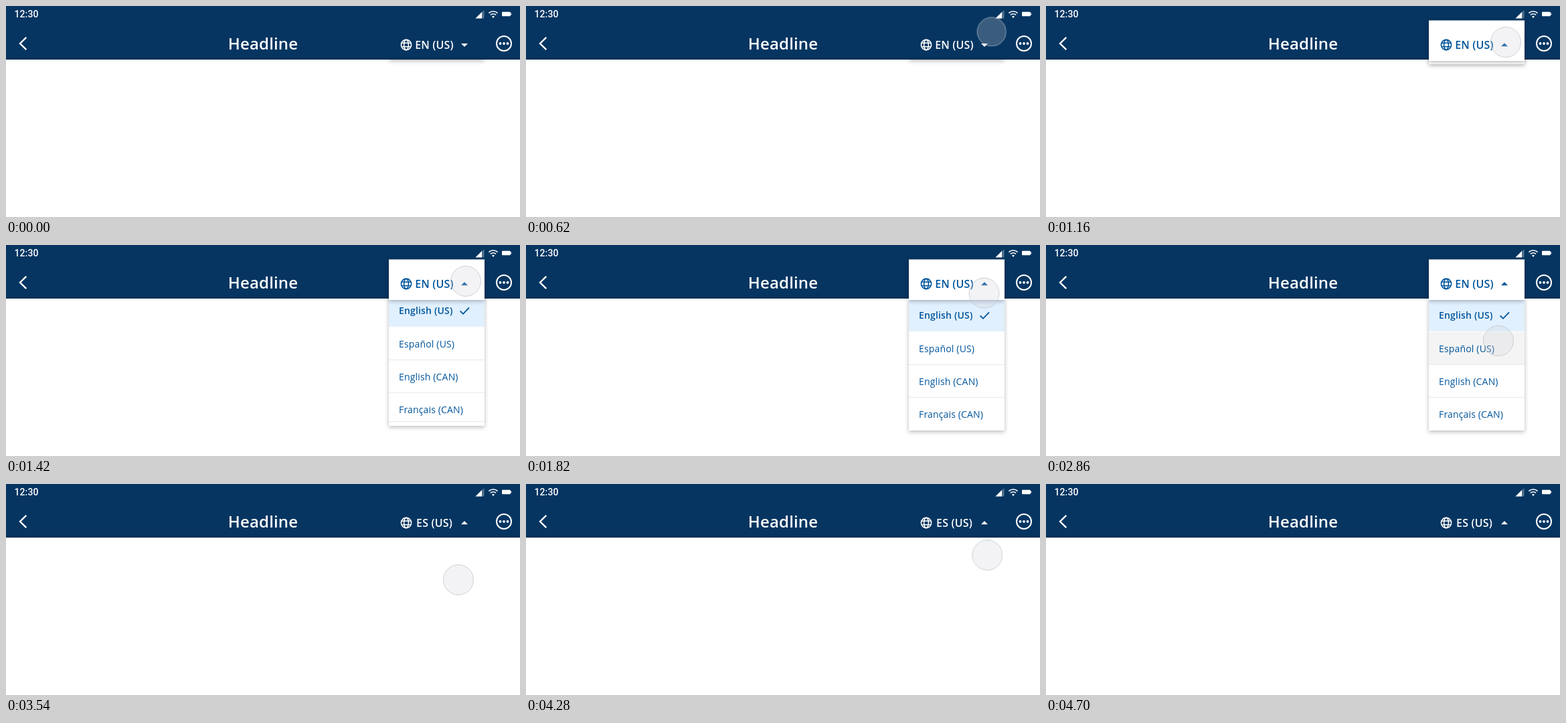
These frames come from a looping animation (768 by 315 pixels, 5400 ms). An HTML page:

```html
<!DOCTYPE html>
<html lang="en">
<head>
<meta charset="utf-8">
<title>Language menu</title>
<style>
  html, body { margin: 0; width: 100%; height: 100%; overflow: hidden; background: #fff; }
  svg { display: block; width: 768px; height: 315px; font-family: "Open Sans", sans-serif; letter-spacing: .01em; }

  .headline { font-size: 24px; font-weight: 600; }
  .clock { font: 500 14px Roboto, sans-serif; letter-spacing: .1px; }
  .label { font-size: 16px; font-weight: 600; text-anchor: middle; }
  .rows { font-size: 14px; fill: #00559b; }
  .bold { font-weight: 600; }
  .icon { fill: none; stroke: currentColor; }
  .shadow { filter: drop-shadow(0 2px 3px rgba(0, 0, 0, .28)); }

  /* One 5.4 s loop: 1% = 54 ms */
  .list, .pointer, .ring, .control, .switch { animation: 5.4s linear infinite both; }
  .switch { animation-timing-function: step-end; }
  .control { animation-name: tint; animation-timing-function: step-end; }
  .list { animation-name: drop; }
  .pointer { animation-name: travel; }
  .ring { animation-name: grow; transform-box: fill-box; transform-origin: center; }

  .panel { animation-name: open; }
  .closed { animation-name: closed; }
  .opened { animation-name: opened; }
  .first { animation-name: first; }
  .second { animation-name: second; }
  .hover { animation-name: hover; }
  .edge { animation-name: edge; }
  .shown { animation-name: shown; }

  @keyframes tint { 0%, 61.481% { color: #fff } 20.741% { color: #00559b } }
  @keyframes open { 0%, 61.481% { opacity: 0 } 20.741% { opacity: 1 } }
  @keyframes shown { 0% { opacity: 1 } 61.481%, 100% { opacity: 0 } }
  @keyframes closed { 0% { opacity: 1 } 20.741%, 100% { opacity: 0 } }
  @keyframes opened { 0% { opacity: 0 } 20.741%, 100% { opacity: 1 } }
  @keyframes first { 0% { opacity: 1 } 56.296%, 100% { opacity: 0 } }
  @keyframes second { 0% { opacity: 0 } 56.296%, 100% { opacity: 1 } }
  @keyframes hover { 0%, 56.296%, 100% { opacity: 0 } 38.889% { opacity: 1 } }
  @keyframes edge { 0% { opacity: 1 } 27.963%, 100% { opacity: 0 } }

  @keyframes drop {
    0%, 20.648% { transform: translateY(-197px); animation-timing-function: cubic-bezier(.4, 0, .2, 1) }
    28.056%, 100% { transform: none }
  }
  @keyframes travel {
    0%, 3.704% { transform: translate(733px, -28px); animation-timing-function: cubic-bezier(.333, 1, .667, 1) }
    22.037% { transform: translate(687px, 54px) }
    30% { transform: translate(687px, 54px); animation-timing-function: cubic-bezier(.4, 0, .7, .95) }
    41.111% { transform: translate(675px, 140px); animation-timing-function: ease-in-out }
    52.963% { transform: translate(676px, 143px) }
    73.8% { transform: translate(676px, 143px); animation-timing-function: ease-in-out }
    92.3%, 100% { transform: translate(749px, -59px) }
  }
  @keyframes grow {
    0%, 17% { transform: scale(.957) }
    20.5%, 100% { transform: none }
  }
</style>
</head>
<body>
<svg viewBox="0 0 768 315">
  <defs>
    <linearGradient id="shade" x2="0" y2="1">
      <stop offset="0" stop-opacity="0"/>
      <stop offset="1" stop-opacity=".14"/>
    </linearGradient>
    <clipPath id="below"><path d="M560 82h170v233h-170z"/></clipPath>
    <path id="check" d="M678.7 105.5l4.3 4.3 9-9.3" fill="none" stroke="#00559b" stroke-width="1.8"/>
  </defs>

  <!-- Menu, sliding out from behind the bar -->
  <g class="switch shown">
    <g class="list">
      <path class="shadow" d="M572 82h143v195h-143z" fill="#fff"/>
      <g class="rows">
        <g class="switch first">
          <path d="M572 82h143v47h-143z" fill="#e1f0fe"/>
          <text class="bold" x="587" y="110">English (US)</text>
          <use href="#check"/>
          <text x="587" y="160" opacity="0">Español (US)</text>
        </g>
        <path class="switch hover" d="M572 130h143v48h-143z" fill="#f4f4f4"/>
        <g class="switch first"><text x="587" y="160">Español (US)</text></g>
        <g class="switch second">
          <path d="M572 130h143v48h-143z" fill="#e1f0fe"/>
          <text x="587" y="110">English (US)</text>
          <text class="bold" x="587" y="160">Español (US)</text>
          <use href="#check" y="50"/>
        </g>
        <text x="587" y="209">English (CAN)</text>
        <text x="587" y="258">Français (CAN)</text>
        <path d="M572 178h143v1h-143zM572 227h143v1h-143z" fill="#e8e9eb"/>
        <path class="switch edge" d="M572 270h143v1h-143z" fill="#e8e9eb"/>
      </g>
    </g>
  </g>

  <!-- App bar -->
  <path d="M0 0h768v80H0z" fill="#063561"/>
  <path d="M0 75h768v5H0z" fill="url(#shade)"/>
  <g fill="#fff" color="#fff">
    <text class="clock" x="12.5" y="17">12:30</text>
    <path d="M701.5 18.5L714.5 6v12.5z" opacity=".3"/>
    <path d="M701.5 18.5L711 9v9.5z"/>
    <g class="icon" stroke-width="1.7">
      <path d="M721.4 10.7a9.4 9.4 0 0 1 13.2 0M724 13.4a5.7 5.7 0 0 1 8 0"/>
    </g>
    <path d="M728 18l-2-2.2a2.9 2.9 0 0 1 4 0z"/>
    <rect x="741" y="8.7" width="12.7" height="6.6" rx="1"/>
    <path d="M753.5 10.5h1.5v3h-1.5z"/>
    <path class="icon" d="M30.3 46.8L21 56l9.3 9.2" stroke-width="2.4"/>
    <text class="headline" x="384" y="65" text-anchor="middle">Headline</text>
    <circle class="icon" cx="744" cy="56" r="11" stroke-width="2"/>
    <circle cx="738.5" cy="56" r="1.9"/>
    <circle cx="744" cy="56" r="1.9"/>
    <circle cx="749.5" cy="56" r="1.9"/>
  </g>

  <!-- Language control -->
  <g class="switch panel">
    <path class="shadow" d="M572 21.5h143V82h-143z" fill="#fff"/>
  </g>
  <g class="control" fill="currentColor">
    <g class="icon" stroke-width="1.6">
      <circle cx="598" cy="58" r="7.6"/>
      <ellipse cx="598" cy="58" rx="3.4" ry="7.6"/>
      <path d="M591 55.3h14M591 60.7h14"/>
    </g>
    <g class="label">
      <text class="switch first" x="640" y="64">EN (US)</text>
      <text class="switch second" x="640" y="64">ES (US)</text>
    </g>
    <path class="switch closed" d="M680 56h10l-5 5z"/>
    <path class="switch opened" d="M680 60.3h10l-5-5z"/>
  </g>

  <g class="pointer">
    <circle class="ring" r="22.5" fill="rgba(208,210,216,.26)" stroke="rgba(190,194,200,.75)"/>
  </g>
</svg>
</body>
</html>
```
